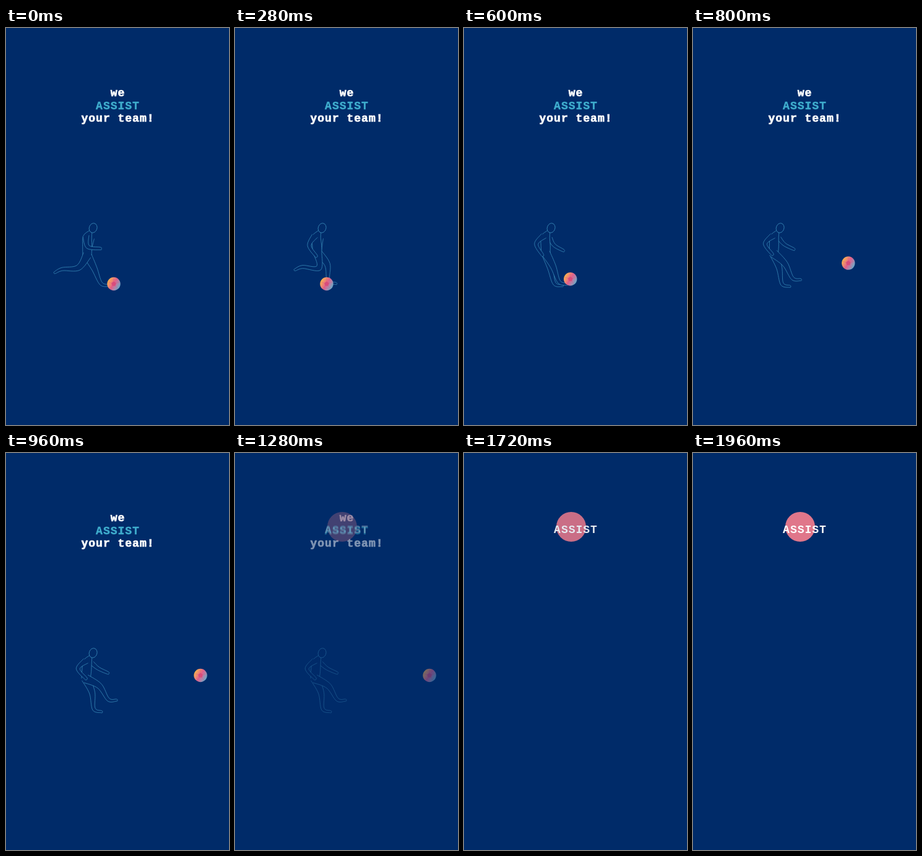
Write an HTML page that moves like this. It is 360 px wide and 640 px high and loops after 2320 ms.

```html
<!DOCTYPE html>
<html lang="en">
<head>
<meta charset="utf-8">
<title>We assist your team</title>
<style>
  html, body { margin: 0; width: 100%; height: 100%; overflow: hidden; background: #002b69; }
  svg { display: block; width: 100%; height: 100%; }
  text { font: bold 18px "Liberation Mono", "Noto Sans Mono", monospace; letter-spacing: 1px; text-anchor: middle; fill: #fff; }
  #headline text { stroke: #fff; stroke-width: .7; }
  #headline .accent { fill: #3fadcd; stroke: #3fadcd; stroke-width: .4; }
  #runner { fill: #002b69; stroke: #3d8fbd; stroke-width: .75; stroke-linejoin: round; }
</style>
</head>
<body>
<svg viewBox="0 0 360 640">
  <defs>
    <linearGradient id="sheen" x1="0" y1=".2" x2="1" y2=".8">
      <stop offset="0" stop-color="#fbc040"/>
      <stop offset=".25" stop-color="#f2926a"/>
      <stop offset=".5" stop-color="#e0608c"/>
      <stop offset=".72" stop-color="#a889ae"/>
      <stop offset="1" stop-color="#4fb4d2"/>
    </linearGradient>
  </defs>
  <rect width="360" height="640" fill="#002b69"/>
  <g id="scene">
    <g id="headline">
      <text x="180.5" y="110">we</text>
      <text x="180.5" y="130.5" class="accent">ASSIST</text>
      <text x="180.5" y="151">your team!</text>
    </g>
    <g id="runner">
      <path id="farArm"/>
      <path id="standLeg"/>
      <path id="torso"/>
      <path id="swingLeg"/>
      <path id="nearArm"/>
      <ellipse rx="6.3" ry="7.8" transform="translate(140.6 322.4) rotate(18)"/>
    </g>
    <g id="ball">
      <circle r="10.7" fill="url(#sheen)"/>
      <path id="patch" fill="#d94c7c"/>
      <path id="seams" stroke="#d9557f" stroke-width=".7" stroke-opacity=".6"/>
    </g>
  </g>
  <g id="ending">
    <circle cx="173" cy="119" r="24" fill="#e0768a"/>
    <text x="180.5" y="129">ASSIST</text>
  </g>
</svg>
<script>
const LOOP = 2320, STEP = 40, LAST = 1960;

// Joint angles in degrees, from the body outwards; 90 points down.
const poses = [
  { at: 0,   hip: [131, 366], swing: [125, 175, 155], stand: [62, 66, 15], near: [80, 8],   far: [100, 100] },
  { at: 280, hip: [133, 362], swing: [85, 184, 159],  stand: [50, 86, 22], near: [120, 57], far: [95, 95] },
  { at: 600, hip: [132, 363], swing: [61, 69, 18],    stand: [73, 75, 15], near: [133, 61], far: [60, 30] },
  { at: 960, hip: [129, 364], swing: [28, 57, 4],     stand: [66, 84, 20], near: [135, 51], far: [40, 25] }
];

// Bone lengths, and half the width at each joint.
const leg = { bones: [25, 26, 13], widths: [7, 4.5, 2.6, 1.7] };
const nearArm = { bones: [18, 20], widths: [5, 3, 2.2] };
const farArm = { bones: [13, 17], widths: [3.5, 2.6, 2] };
const torsoWidths = [7, 7.5, 7, 2.5];
const neck = [136.5, 328], chest = [131.5, 337], nearShoulder = [129, 335], farShoulder = [139, 339];

const $ = id => document.getElementById(id);
const progress = (t, from, to) => Math.min(1, Math.max(0, (t - from) / (to - from)));
const mix = (a, b, k) => a.map((v, i) => v + (b[i] - v) * k);
const polar = (degrees, r) => {
  const a = degrees * Math.PI / 180;
  return [r * Math.cos(a), r * Math.sin(a)];
};
const add = (p, q) => [p[0] + q[0], p[1] + q[1]];

function poseAt(t) {
  let i = 0;
  while (i < poses.length - 2 && t >= poses[i + 1].at) i++;
  const a = poses[i], b = poses[i + 1], k = progress(t, a.at, b.at);
  const pose = {};
  for (const key of ["hip", "swing", "stand", "near", "far"]) pose[key] = mix(a[key], b[key], k);
  return pose;
}

// Smooth open curve through points.
function curve(points) {
  const at = i => points[Math.min(points.length - 1, Math.max(0, i))];
  const handle = (p, a, b) => p.map((v, i) => v + (b[i] - a[i]) / 6);
  let d = "M" + at(0);
  for (let i = 0; i < points.length - 1; i++) {
    const p = at(i), q = at(i + 1);
    d += "C" + [handle(p, at(i - 1), q), handle(q, at(i + 2), p), q].join(" ");
  }
  return d;
}

const chain = (start, angles, bones) =>
  bones.reduce((joints, length, i) => [...joints, add(joints[i], polar(angles[i], length))], [start]);

// Outline of a tapered limb, left open where it joins the body.
function outline(joints, widths) {
  const last = joints.length - 1;
  const unit = (p, q) => {
    const x = q[0] - p[0], y = q[1] - p[1], n = Math.hypot(x, y) || 1;
    return [x / n, y / n];
  };
  const heading = i => unit([0, 0], add(
    i > 0 ? unit(joints[i - 1], joints[i]) : [0, 0],
    i < last ? unit(joints[i], joints[i + 1]) : [0, 0]));
  const side = sign => joints.map((p, i) => {
    const [x, y] = heading(i), w = sign * widths[i];
    return add(p, [-y * w, x * w]);
  });
  const tip = add(joints[last], heading(last).map(v => v * widths[last]));
  return curve([...side(1), tip, ...side(-1).reverse()]);
}

const draw = (id, joints, widths) => $(id).setAttribute("d", outline(joints, widths));
const drawLimb = (id, start, angles, limb) => draw(id, chain(start, angles, limb.bones), limb.widths);

const corners = [0, 1, 2, 3, 4].map(i => i * 72 - 90);
$("patch").setAttribute("d", "M" + corners.map(a => polar(a, 4)).join("L") + "Z");
$("seams").setAttribute("d", corners.map(a => `M${polar(a, 4)}L${polar(a, 9.5)}`).join(""));

function ballAt(t) {
  const rolled = mix([174, 412.5], [148, 412.5], progress(t, 0, 280));
  return mix(rolled, [314, 358.5], progress(t, 540, 960));
}

function render(t) {
  const { hip, swing, stand, near, far } = poseAt(t);
  drawLimb("farArm", farShoulder, far, farArm);
  drawLimb("standLeg", hip, stand, leg);
  draw("torso", [hip, mix(hip, chest, .45), chest, neck], torsoWidths);
  drawLimb("swingLeg", hip, swing, leg);
  drawLimb("nearArm", nearShoulder, near, nearArm);
  $("ball").setAttribute("transform", `translate(${ballAt(t)})`);
  $("scene").setAttribute("opacity", 1 - progress(t, 1080, 1480));
  $("ending").setAttribute("opacity", Math.sin(progress(t, 1120, LAST) * Math.PI / 2));
}

function tick() {
  const t = performance.now() % LOOP;
  render(Math.min(LAST, Math.floor(t / STEP) * STEP));
  requestAnimationFrame(tick);
}
tick();
</script>
</body>
</html>
```
